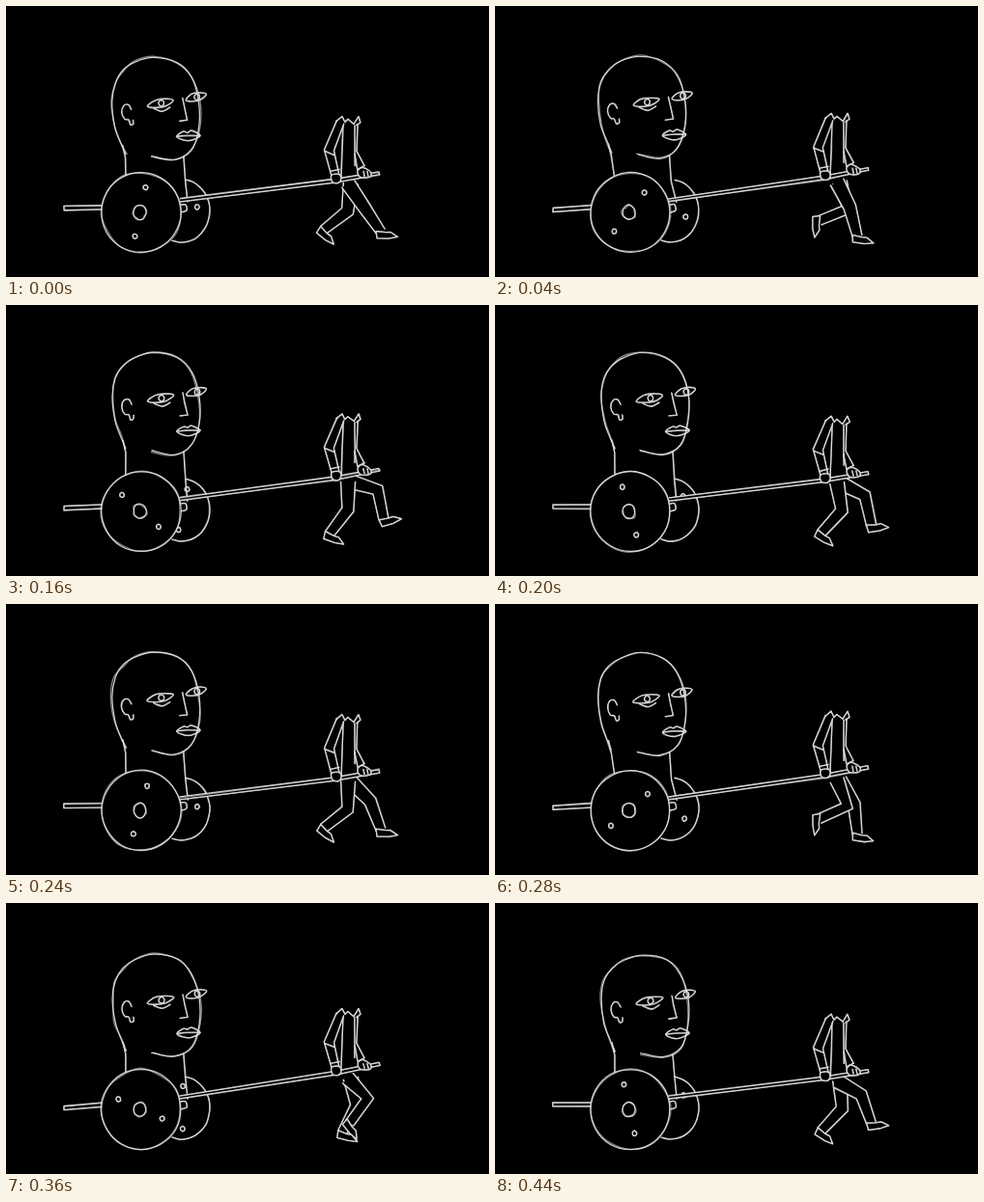
Recreate the animation shown at these times as an HTML page with a canvas. Size 500x281 px, loop 480 ms.

```html
<!DOCTYPE html>
<html lang="en">
<head>
<meta charset="utf-8">
<title>Head cart</title>
<style>
html, body { margin: 0; width: 100%; height: 100%; overflow: hidden; background: #000; }
canvas { display: block; width: 500px; height: 281px; }
</style>
</head>
<body>
<canvas id="stage" width="500" height="281"></canvas>
<script>
const ctx = document.getElementById('stage').getContext('2d');
const STEP = 40, COUNT = 12;
const THIGH = 29, SHIN = 31;
const rad = deg => deg * Math.PI / 180;

// Ankle path of one leg over the loop: step, x, y, shoe pitch.
const stride = [
  [0, 329, 232, 46], [1, 336, 222.5, 97], [3, 356, 228, 58], [4, 391, 222, -10],
  [6, 388, 234, 8], [7, 375, 238.5, 14], [10, 335, 237, 27], [11, 338, 236, 40],
  [12, 329, 232, 46]
];

let seed = 1;
function rnd() {
  seed = (seed * 16807) % 2147483647;
  return seed / 2147483647 - 0.5;
}

// Catmull-Rom when smooth, straight segments otherwise.
function trace(pts, smooth, closed) {
  const n = pts.length;
  const p = j => closed ? pts[(j + n) % n] : pts[Math.max(0, Math.min(n - 1, j))];
  ctx.beginPath();
  ctx.moveTo(...pts[0]);
  for (let j = 0; j < (closed ? n : n - 1); j++) {
    const [a, b, c, d] = [p(j - 1), p(j), p(j + 1), p(j + 2)];
    if (!smooth) ctx.lineTo(...c);
    else ctx.bezierCurveTo(
      b[0] + (c[0] - a[0]) / 6, b[1] + (c[1] - a[1]) / 6,
      c[0] - (d[0] - b[0]) / 6, c[1] - (d[1] - b[1]) / 6, c[0], c[1]);
  }
  if (closed) ctx.closePath();
}

function blank(pts, smooth = false) {
  trace(pts, smooth, true);
  ctx.fill();
}

// A pencil line: one firm pass and one loose, lighter pass.
function ink(pts, { smooth = true, closed = false, fill = false, wob = 1.2 } = {}) {
  if (fill) blank(pts, smooth);
  for (const [alpha, amount] of [[0.95, wob * 0.3], [0.6, wob]]) {
    ctx.globalAlpha = alpha;
    trace(pts.map(([x, y]) => [x + rnd() * amount, y + rnd() * amount]), smooth, closed);
    ctx.stroke();
  }
  ctx.globalAlpha = 1;
}

const line = (...pts) => ink(pts, { smooth: false });
const shift = (x, y, pts) => pts.map(([a, b]) => [x + a, y + b]);

function oval(x, y, rx, ry, opt, from = 0, to = 360) {
  const n = 12, closed = to - from === 360, pts = [];
  for (let j = 0; j < n + !closed; j++) {
    const a = rad(from + (to - from) * j / n);
    pts.push([x + rx * Math.cos(a), y + ry * Math.sin(a)]);
  }
  ink(pts, { closed, ...opt });
}

// Two outline sides along a jointed limb.
function limb(joints, widths) {
  const last = joints.length - 1, left = [], right = [];
  joints.forEach(([x, y], j) => {
    const a = joints[Math.max(0, j - 1)], b = joints[Math.min(last, j + 1)];
    const dx = b[0] - a[0], dy = b[1] - a[1], k = widths[j] / (Math.hypot(dx, dy) || 1);
    left.push([x - dy * k, y + dx * k]);
    right.push([x + dy * k, y - dx * k]);
  });
  blank([...left, ...right.slice().reverse()]);
  line(...left);
  line(...right);
}

// Each footfall lifts and drops the walker and tugs the cart.
function motion(i) {
  return {
    bob: Math.cos(rad(60 * (i + 0.7))),
    tug: Math.max(0, Math.cos(rad(60 * (i - 1.1)))) ** 3,
    nod: Math.cos(rad(30 * (i - 10.5))),
    roll: 30 * i - 75 + 8 * Math.cos(rad(30 * (i - 8.5)))
  };
}

function eye(x, y, w) {
  ink(shift(x, y, [[-w, 3], [-w * 0.4, -3], [w * 0.4, -4.5], [w, -3], [w * 0.4, 3], [-w * 0.4, 4.5]]), { closed: true });
  oval(x + 1, y, 2.8, 3.2, { wob: 0.8 });
}

function drawHead({ nod, tug }) {
  const x = 110 - 3.5 * tug, y = 51.5 + 2.5 * nod;
  const at = pts => shift(x, y, pts);
  line([x + 74, y + 103], [x + 76, 182], [188, 203]);
  line([x + 11, y + 91], [x + 14, y + 104], [124, 180]);
  ink(at([
    [14, 100], [9, 88], [3, 71], [0, 46], [3, 27], [11, 14], [24, 5], [43, 0], [67, 5],
    [82, 20], [90, 45], [90, 73], [82, 96], [64, 106], [41, 102]
  ]), { wob: 3 });
  eye(x + 50, y + 47.5, 13.5);
  eye(x + 87, y + 41, 10.5);
  ink(at([[43, 53], [52, 56], [60, 52]]));
  ink(at([[73, 42], [75, 52], [78, 65], [70, 66]]), { smooth: false });
  ink(at([[67, 82], [74, 77], [78, 78], [82, 76], [91, 81], [82, 86], [74, 86]]), { closed: true });
  ink(at([[67, 82], [78, 81], [91, 81]]));
  ink(at([[20, 54], [17, 49], [12, 50], [10, 57], [13, 64], [17, 65], [19, 70], [22, 69], [22, 65]]));
}

function holes(x, y, rx, ry, turn) {
  for (const a of [rad(turn), rad(turn + 180)])
    oval(x + rx * Math.cos(a), y + ry * Math.sin(a), 2.3, 2.5, { wob: 1 });
}

function drawBackWheel({ roll }) {
  oval(182, 212.5, 29, 32.5, { fill: true }, -82, 110);
  holes(183, 212, 15, 22, roll + 68);
  ink([[181, 206], [186, 206], [187, 212], [181, 214]]);
}

function drawFrontWheel({ roll }) {
  oval(140, 214, 41, 41.5, { fill: true, wob: 2.6 });
  oval(138.5, 214, 6.5, 7.5, { wob: 2.4 });
  holes(139, 213.5, 24.5, 26, roll);
}

function drawTail({ bob }) {
  const y = 211 - 2 * bob;
  ink([[100, 207], [60, y - 2], [60, y + 2], [100, 211]], { smooth: false, wob: 1.8 });
}

function drawShaft({ bob }) {
  const grip = 179 + 3.2 * bob, tip = 170 + 4.5 * bob;
  ink([[180, 200], [341, grip - 2], [386, tip - 1.5], [387, tip + 1.5], [341, grip + 1.5], [180, 203]],
    { smooth: false, wob: 1.8, fill: true });
}

function foot(i) {
  const k = stride.findIndex(s => s[0] > i);
  const a = stride[k - 1], b = stride[k], f = (i - a[0]) / (b[0] - a[0]);
  return [1, 2, 3].map(j => a[j] + (b[j] - a[j]) * f);
}

// The knee follows from hip and ankle and always bends forward.
function drawLeg(hx, hy, i) {
  const [ax, ay, pitch] = foot(i % COUNT);
  const dx = ax - hx, dy = ay - hy, d = Math.hypot(dx, dy);
  const along = Math.min(THIGH, (THIGH ** 2 - SHIN ** 2 + d * d) / (2 * d));
  const out = Math.sqrt(THIGH ** 2 - along ** 2);
  const knee = [hx + (dx * along + dy * out) / d, hy + (dy * along - dx * out) / d];
  limb([[hx, hy], knee, [ax, ay]], [7.5, 6.5, 5]);

  const c = Math.cos(rad(pitch)), s = Math.sin(rad(pitch));
  const shoe = [[-5, 0], [-3, 7.5], [9, 6], [18, 3], [10, -1], [5, 0]];
  ink(shoe.map(([u, v]) => [ax + c * u - s * v, ay + s * u + c * v]), { smooth: false, closed: true, fill: true });
}

function drawMan(m, i) {
  const up = pts => shift(0, 3.4 * m.bob, pts);
  const hip = 183 + 1.5 * m.bob;
  drawLeg(357, hip, i);
  drawLeg(354, hip, i + 6);

  blank(up([[349, 117], [364, 117], [361, 178], [347, 180]]));
  line(...up([[349, 120], [348, 150], [347, 178]]));
  line(...up([[361, 121], [361, 148], [361, 163]]));
  line(...up([[364, 120], [363, 148], [371, 163]]));
  line(...up([[361, 151], [364, 167], [371, 163]]));
  limb(up([[346, 118], [334.5, 147], [341, 173]]), [4, 5, 4]);
  line(...up([[330, 148], [340, 152]]));
  line(...up([[336, 169], [345, 167]]));
  ink(up([[342, 117], [348, 112], [351, 118], [354, 115], [360, 120], [365, 112], [367, 118], [363, 121]]), { smooth: false });

  drawShaft(m);
  ink(up([[337, 173], [345, 172], [347, 177], [344, 181], [338, 180]]), { closed: true, fill: true });
  ink(up([[364, 169], [368, 165], [374, 167], [378, 171], [376, 175], [367, 175]]), { closed: true, fill: true });
  for (const x of [370, 374]) line(...up([[x, 169], [x + 1, 174]]));
}

function draw(i) {
  seed = 977 + i * 7919;
  ctx.fillStyle = '#000';
  ctx.fillRect(0, 0, 500, 281);
  ctx.strokeStyle = '#dcdcdc';
  ctx.lineWidth = 1.3;
  ctx.lineJoin = ctx.lineCap = 'round';
  const m = motion(i);
  drawTail(m);
  drawBackWheel(m);
  drawHead(m);
  drawMan(m, i);
  drawFrontWheel(m);
}

const start = performance.now();
let shown = -1;
function tick() {
  const i = Math.floor((performance.now() - start) / STEP) % COUNT;
  if (i !== shown) draw(shown = i);
  requestAnimationFrame(tick);
}
tick();
</script>
</body>
</html>
```
